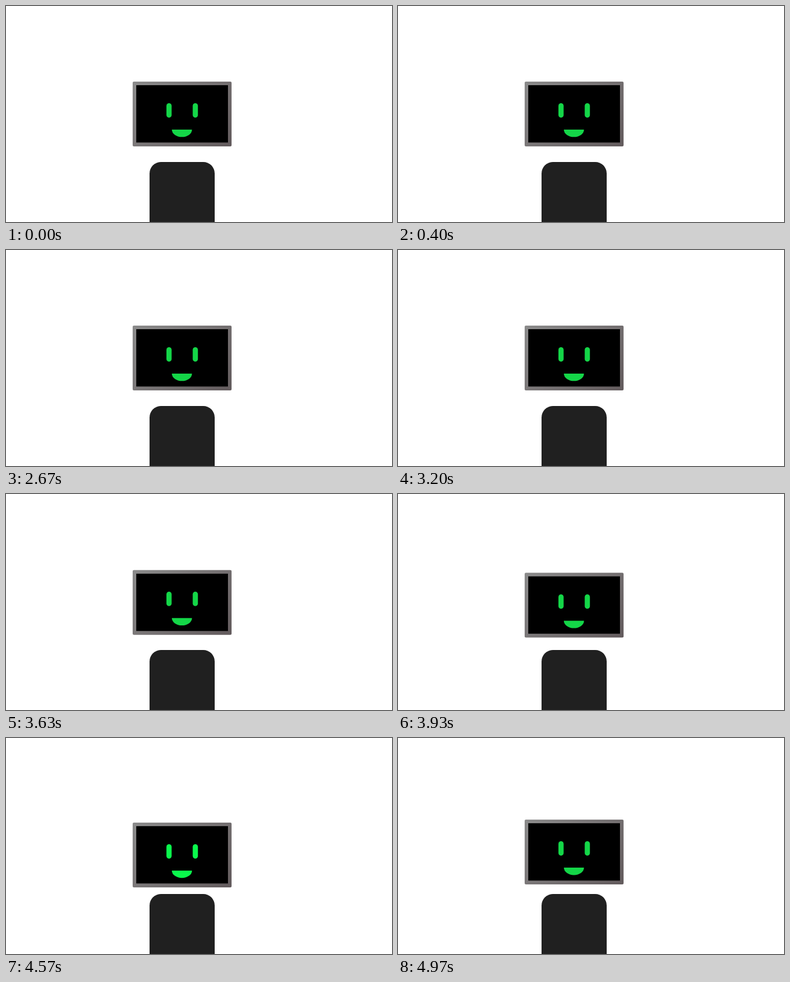
An HTML page that plays this animation: 640x360 px, repeating every 5 s.

```html
<!DOCTYPE html>
<html lang="en">
<head>
<meta charset="utf-8">
<title>Robot</title>
<style>
  html, body { margin: 0; width: 100%; height: 100%; overflow: hidden; background: #fff; }
  svg { display: block; width: 640px; height: 360px; }
</style>
</head>
<body>
<svg viewBox="0 0 640 360">
  <defs>
    <linearGradient id="metal" gradientUnits="userSpaceOnUse" x1="220" y1="110" x2="364" y2="250">
      <stop offset="0" stop-color="#8c8c8c"/>
      <stop offset="1" stop-color="#625a5c"/>
    </linearGradient>
  </defs>
  <rect x="238" y="260" width="108" height="130" rx="19" fill="#202020"/>
  <g id="head">
    <rect x="210" y="126" width="164" height="108" rx="2" fill="url(#metal)"/>
    <rect x="216" y="132" width="152" height="95.5"/>
    <g id="face">
      <rect x="266" y="162" width="8.6" height="24" rx="4.3"/>
      <rect x="309.6" y="162" width="8.6" height="24" rx="4.3"/>
      <path d="M275 206H308.4A16.7 12.3 0 0 1 275 206Z"/>
    </g>
  </g>
</svg>
<script>
  const LOOP = 5000, START = 3577, TURN = 4610, SPEED = 0.015;
  const head = document.getElementById('head');
  const face = document.getElementById('face');
  const mix = (a, b, k) => Math.round(a + (b - a) * k);

  function draw(now) {
    const t = now % LOOP;
    // The head sinks at constant speed, then rises until the loop cuts.
    const drop = Math.max(0, TURN - START - Math.abs(t - TURN)) * SPEED;
    // The face brightens near the lowest point.
    const glow = Math.min(1, Math.max(0, (drop - 10.2) / 4.5));
    head.setAttribute('transform', `translate(0 ${drop.toFixed(2)})`);
    face.setAttribute('fill', `rgb(${mix(20, 10, glow)},${mix(214, 248, glow)},${mix(72, 76, glow)})`);
    requestAnimationFrame(() => draw(performance.now()));
  }
  draw(performance.now());
</script>
</body>
</html>
```
